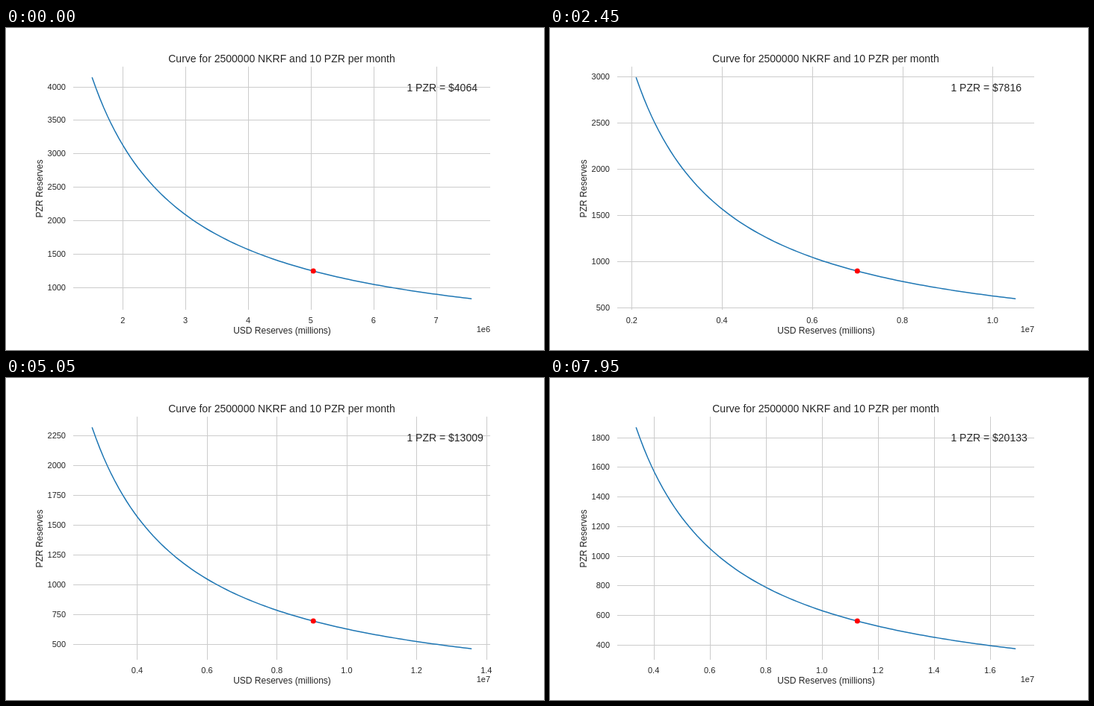
An HTML page for the animation above (8 s loop, 720x432 px).

```html
<!DOCTYPE html>
<html lang="en">
<head>
<meta charset="utf-8">
<title>Reserve curve</title>
<style>
  html, body { margin: 0; width: 100%; height: 100%; overflow: hidden; background: #fff; }
  svg { display: block; width: 720px; height: 432px; font-family: "Liberation Sans", Arial, sans-serif; fill: #262626; }
  .ticks { font-size: 11px; }
  .labels { font-size: 12px; text-anchor: middle; }
  .large { font-size: 14px; }
  .grid { stroke: #ccc; fill: none; }
  .curve { stroke: #1f77b4; stroke-width: 1.5; stroke-linejoin: round; stroke-linecap: round; fill: none; }
</style>
</head>
<body>
<svg viewBox="0 0 720 432">
  <path class="grid" id="grid"/>
  <path class="curve" id="curve"/>
  <circle id="dot" r="3.5" fill="red"/>
  <g class="ticks">
    <g id="xTicks" text-anchor="middle"></g>
    <g id="yTicks" text-anchor="end"></g>
    <text id="exponent" x="648" y="408" text-anchor="end"></text>
  </g>
  <g class="labels">
    <text x="369.5" y="410">USD Reserves (millions)</text>
    <text id="yLabel" transform="translate(49 215.5) rotate(-90)"></text>
  </g>
  <text class="large" id="title" x="369" y="46" text-anchor="middle"></text>
  <text class="large" id="price" x="536.4" y="85"></text>
</svg>
<script>
const COIN = 'PZR', STABLE = 'NKRF';
const STEP_MS = 50, STEPS = 160;
const LEFT = 90, RIGHT = 648, TOP = 51.84, BOTTOM = 378;
const NEAR = 0.3, FAR = 1.5;   // curve extent relative to the current USD reserve
const MARGIN = 0.05, MAX_BINS = 9;

const el = id => document.getElementById(id);
el('title').textContent = `Curve for 2500000 ${STABLE} and 10 ${COIN} per month`;
el('yLabel').textContent = `${COIN} Reserves`;

// Constant-product pool with a 1% fee; each step trades 1/61 of a month's volume both ways.
function simulate() {
  const usdIn = 2500000 / 61, coinIn = 10 / 61, keep = 0.99;
  const states = [];
  let usd = 5e6, coin = 1250;
  for (let i = 0; i < STEPS; i++) {
    coin *= usd / (usd + keep * usdIn);
    usd += usdIn;
    usd *= coin / (coin + keep * coinIn);
    coin += coinIn;
    states.push({ usd, coin });
  }
  return states;
}

// Linear axis whose data range is padded on both sides.
function makeAxis(min, max, from, to) {
  const pad = (max - min) * MARGIN, lo = min - pad, hi = max + pad;
  const raw = (hi - lo) / MAX_BINS, power = 10 ** Math.floor(Math.log10(raw));
  const step = power * [1, 2, 2.5, 5, 10].find(m => m * power >= raw);
  const ticks = [];
  for (let i = Math.ceil(lo / step); i * step <= hi; i++) ticks.push(i * step);
  return { ticks, at: v => from + (v - lo) / (hi - lo) * (to - from) };
}

const label = (x, y, text) => `<text x="${x}" y="${y}">${text}</text>`;

function draw({ usd, coin }) {
  const xAxis = makeAxis(usd * NEAR, usd * FAR, LEFT, RIGHT);
  const yAxis = makeAxis(coin / FAR, coin / NEAR, BOTTOM, TOP);
  const exponent = Math.max(...xAxis.ticks) >= 1e7 ? 7 : 6;
  const digits = exponent - 6;
  let grid = '', xText = '', yText = '';

  for (const v of xAxis.ticks) {
    const x = xAxis.at(v);
    grid += `M${Math.round(x) + 0.5} ${TOP}V${BOTTOM}`;
    xText += label(x.toFixed(2), 396, (v / 10 ** exponent).toFixed(digits));
  }
  for (const v of yAxis.ticks) {
    const y = Math.round(yAxis.at(v));
    grid += `M${LEFT} ${y + 0.5}H${RIGHT}`;
    yText += label(80, y + 4, v);
  }
  const points = Array.from({ length: 100 }, (_, i) => {
    const r = NEAR + (FAR - NEAR) * i / 99;
    return `${xAxis.at(usd * r).toFixed(2)} ${yAxis.at(coin / r).toFixed(2)}`;
  });

  el('grid').setAttribute('d', grid);
  el('curve').setAttribute('d', 'M' + points.join('L'));
  el('dot').setAttribute('cx', xAxis.at(usd));
  el('dot').setAttribute('cy', yAxis.at(coin));
  el('xTicks').innerHTML = xText;
  el('yTicks').innerHTML = yText;
  el('exponent').textContent = `1e${exponent}`;
  el('price').textContent = `1 ${COIN} = $${Math.round(usd / coin)}`;
}

const states = simulate();
const start = performance.now();
let shown = -1;

function tick() {
  const index = Math.floor((performance.now() - start) / STEP_MS) % STEPS;
  if (index !== shown) draw(states[shown = index]);
  requestAnimationFrame(tick);
}
tick();
</script>
</body>
</html>
```
